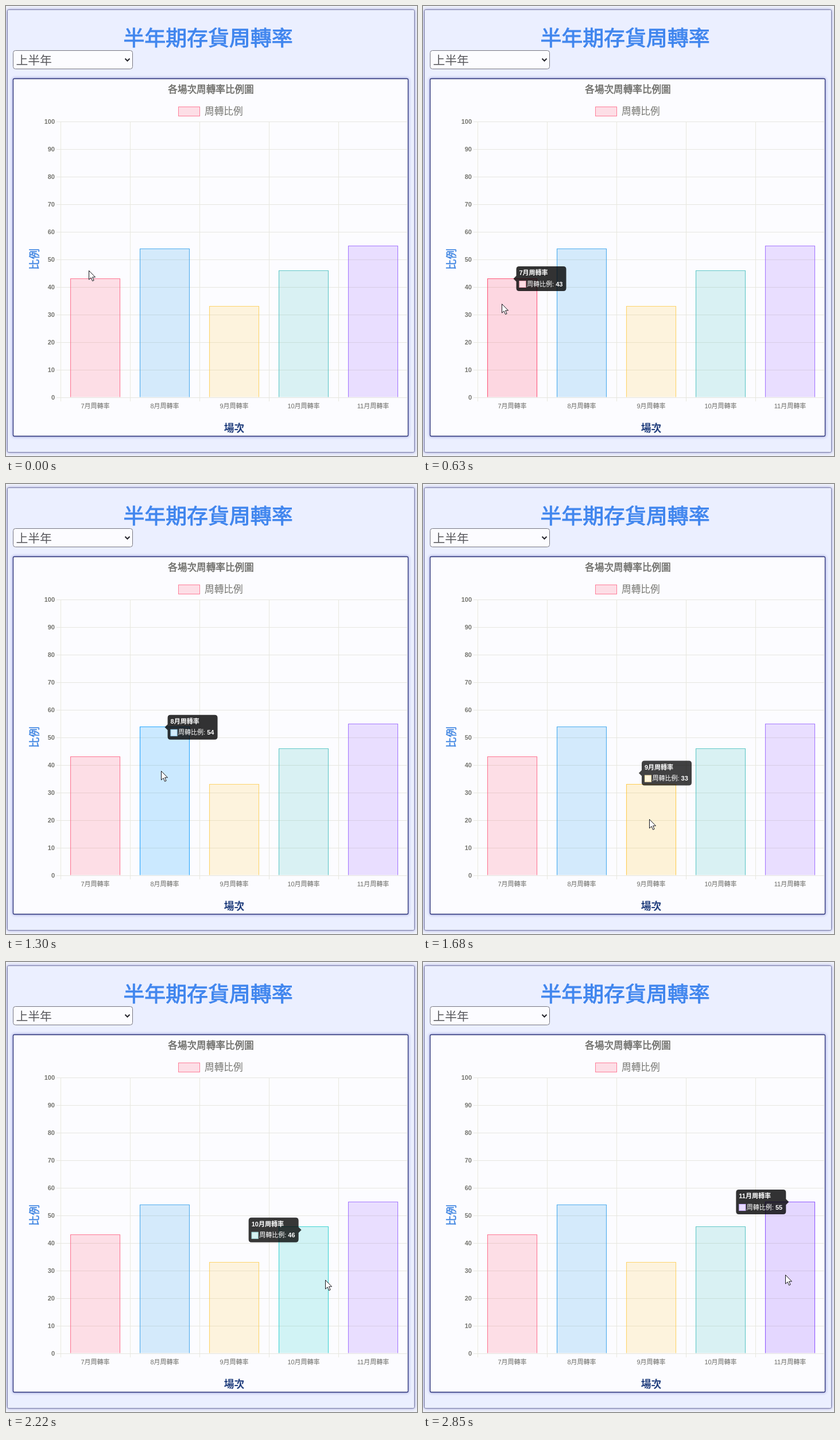
Animation, 716 px wide and 783 px high, one loop 2.89 s. Source, as an HTML page:

```html
<!DOCTYPE html>
<html lang="zh-Hant">
<head>
<meta charset="utf-8">
<title>半年期存貨周轉率</title>
<style>
html, body { margin: 0; width: 100%; height: 100%; overflow: hidden; background: #f0f2fb; }
svg { display: block; width: 100%; height: 100%; }
text { font-family: "Liberation Sans", "Noto Sans CJK TC", "Noto Sans CJK JP", "Noto Sans CJK", sans-serif; }
.glow { filter: drop-shadow(0 0 2.5px #8a8dd0); }
</style>
</head>
<body>
<svg id="stage" viewBox="0 0 716 783"></svg>
<script>
const NS = 'http://www.w3.org/2000/svg';
const stage = document.getElementById('stage');
const LOOP = 2890, HOLD = 126, STEP = 41.85;
const LEFT = 95.5, TOP = 201, BOTTOM = 680.5, COL = 121, BAR = 87;
const TIP_W = 87, TIP_H = 43, GAP = 45;

const bars = [
  { month: 7, value: 43, rgb: [255, 99, 132], hot: [255, 64, 104], enter: 250 },
  { month: 8, value: 54, rgb: [54, 162, 235], hot: [5, 154, 255], enter: 1044 },
  { month: 9, value: 33, rgb: [255, 206, 86], hot: [255, 196, 52], enter: 1544 },
  { month: 10, value: 46, rgb: [75, 192, 192], hot: [34, 207, 207], enter: 2043 },
  { month: 11, value: 55, rgb: [153, 102, 255], hot: [129, 66, 255], enter: 2526 }
];

// time, x, y of the pointer tip
const path = [
  [130, 144, 460], [250, 142, 476], [420, 138, 511], [630, 137, 518], [850, 164, 513],
  [990, 199, 507], [1044, 233, 503], [1190, 264, 500], [1300, 270, 499], [1400, 285, 514],
  [1490, 320, 544], [1544, 354, 566], [1610, 380, 579], [1680, 394, 583], [1850, 414, 580],
  [1985, 441, 573], [2043, 475, 567], [2140, 530, 557], [2220, 556, 553], [2400, 560, 552],
  [2475, 564, 551], [2526, 596, 548], [2600, 631, 544], [2850, 631, 544]
];

function el(name, attrs, parent = stage) {
  const node = document.createElementNS(NS, name);
  for (const key in attrs) node.setAttribute(key, attrs[key]);
  return parent.appendChild(node);
}

// cy is the optical middle of the line
function label(str, x, cy, size, fill, opts = {}, parent = stage) {
  const node = el('text', { x, y: cy + size * 0.37, 'font-size': size, fill, ...opts }, parent);
  node.textContent = str;
  return node;
}

const clamp = v => Math.max(0, Math.min(1, v));
const mix = (a, b, p) => a + (b - a) * p;
const outQuart = p => 1 - (1 - clamp(p)) ** 4;
const rgba = (c, a) => `rgba(${c.map(Math.round)},${a})`;
const yOf = v => BOTTOM - (BOTTOM - TOP) * v / 100;
const mid = { 'text-anchor': 'middle' };
const midBold = { ...mid, 'font-weight': 700 };
// a thin outline gives a weight between regular and bold
const medium = (color, width) => ({ ...mid, stroke: color, 'stroke-width': width });

function drawPage() {
  el('rect', { width: 716, height: 783, fill: '#f0f2fb' });
  el('rect', { x: 2.5, y: 6.5, width: 709, height: 770, rx: 2, fill: '#ebefff', stroke: '#7c7ea4', class: 'glow' });
  label('半年期存貨周轉率', 352, 55.5, 36.9, '#4186ee', medium('#4186ee', 1));
  el('rect', { x: 12.5, y: 77.5, width: 208, height: 32, rx: 4, fill: '#fcfcff', stroke: '#777781' });
  label('上半年', 17.5, 94, 20.8, '#58585c', { 'font-weight': 300 });
  el('path', { d: 'M207.5 91.5l4 4 4-4', fill: 'none', stroke: '#25252c', 'stroke-width': 2 });
  el('rect', { x: 12.5, y: 126.5, width: 688, height: 622, rx: 2, fill: '#fcfcff', stroke: '#2b3378', 'stroke-width': 1.3, class: 'glow' });
}

function drawChart() {
  label('各場次周轉率比例圖', 357, 145, 16.6, '#6c6c68', medium('#6c6c68', 0.5));
  el('rect', { x: 300.5, y: 175.5, width: 37, height: 16, fill: rgba(bars[0].rgb, 0.2), stroke: rgba(bars[0].rgb, 0.8) });
  label('周轉比例', 346, 182.5, 16.7, '#74746f');

  for (let v = 0; v <= 100; v += 10) {
    const y = Math.round(yOf(v)) + 0.5;
    el('path', { d: `M88 ${y}H699.5`, stroke: '#e6e6e0' });
    label(v, 85, y - 0.5, 11, '#74746e', { 'text-anchor': 'end', 'font-weight': 700 });
  }
  for (let i = 0; i < 5; i++) el('path', { d: `M${LEFT + i * COL} 201V688`, stroke: '#e8e8de' });

  bars.forEach((b, i) => {
    b.mid = LEFT + (i + 0.5) * COL - 0.5;
    b.y = Math.round(yOf(b.value)) + 0.5;
    const x = b.mid - BAR / 2 + 0.5, w = BAR - 1;
    b.fill = el('rect', { x, y: b.y, width: w, height: BOTTOM - b.y });
    b.edge = el('path', { d: `M${x} ${BOTTOM}V${b.y}h${w}V${BOTTOM}`, fill: 'none', 'stroke-width': 1.1 });
    b.leave = i < 4 ? bars[i + 1].enter - GAP : LOOP;
    b.tipX = i < 3 ? b.mid + 7 : b.mid - 7 - TIP_W;
    label(b.month + '月周轉率', b.mid, 696, 11, '#6c6c68', mid);
  });

  label('場次', 397.5, 734, 17.8, '#24417f', midBold);
  label('比例', 0, 0, 18.4, '#4186e2', { ...medium('#4186e2', 0.5), transform: 'translate(49.5 440.5) rotate(-90)' });
}

function makeTip() {
  const g = el('g', {});
  const box = el('path', { fill: 'rgba(0,0,0,.8)' }, g);
  const title = label('', 5, 11, 11, '#fff', { 'font-weight': 700 }, g);
  el('rect', { x: 5, y: 25, width: 12, height: 12, fill: '#fff' }, g);
  const chip = el('rect', { x: 5.5, y: 25.5, width: 11, height: 11 }, g);
  const line = label('周轉比例: ', 18.5, 30.5, 11, '#fff', {}, g);
  const value = el('tspan', { 'font-weight': 700 }, line);
  return { g, box, title, chip, value };
}

function tipShape(onLeft) {
  const h = TIP_H / 2, r = 5, s = TIP_H - 2 * r, w = TIP_W - 2 * r;
  const right = onLeft ? `v${s}` : `v${h - r - 5}l5 5-5 5v${h - r - 5}`;
  const left = onLeft ? `v${5 + r - h}l-5-5 5-5v${5 + r - h}` : `v${-s}`;
  return `M${r} 0h${w}q${r} 0 ${r} ${r}${right}q0 ${r} ${-r} ${r}h${-w}q${-r} 0 ${-r} ${-r}${left}q0 ${-r} ${r} ${-r}z`;
}

drawPage();
drawChart();
const tip = makeTip();
const pointer = el('path', {
  d: 'M0 0V15.5L3.6 12.2 6.1 18 8.6 16.9 6.1 11.3H11Z',
  fill: '#fff', stroke: '#16161c', 'stroke-linejoin': 'round'
});

function heat(b, t) {
  const on = outQuart((t - b.enter) / 400);
  return t < b.enter ? 0 : t < b.leave ? on : 1 - outQuart((t - b.leave) / 400);
}

function drawTip(t) {
  const i = bars.findLastIndex(b => t >= b.enter);
  if (i < 0) return tip.g.setAttribute('opacity', 0);
  const b = bars[i], from = bars[i - 1] || b;
  const p = outQuart((t - b.enter) / 400);
  const start = i ? 1 - GAP / 200 : 0;
  const alpha = t < b.leave ? mix(start, 1, clamp((t - b.enter) / 200)) : 1 - (t - b.leave) / 200;
  const x = mix(from.tipX, b.tipX, p), y = mix(from.y, b.y, p) - TIP_H / 2;
  tip.g.setAttribute('opacity', alpha);
  tip.g.setAttribute('transform', `translate(${x} ${y})`);
  tip.box.setAttribute('d', tipShape(i < 3));
  tip.title.textContent = b.month + '月周轉率';
  tip.value.textContent = b.value;
  tip.chip.setAttribute('fill', rgba(b.rgb, 0.22));
  tip.chip.setAttribute('stroke', rgba(b.rgb, 0.5));
}

function pointerAt(t) {
  const n = path.findIndex(k => k[0] > t);
  if (n === 0) return path[0].slice(1);
  if (n < 0) return path[path.length - 1].slice(1);
  const a = path[n - 1], b = path[n], p = (t - a[0]) / (b[0] - a[0]);
  return [mix(a[1], b[1], p), mix(a[2], b[2], p)];
}

function draw(ms) {
  // the picture advances in even steps after a short hold
  const t = ms < HOLD ? 0 : HOLD + 4 + Math.floor((ms - HOLD) / STEP) * STEP;
  for (const b of bars) {
    const h = heat(b, t), c = b.rgb.map((v, k) => mix(v, b.hot[k], h));
    b.fill.setAttribute('fill', rgba(c, 0.2));
    b.edge.setAttribute('stroke', rgba(c, 0.85));
  }
  drawTip(t);
  const [x, y] = pointerAt(t).map(Math.round);
  pointer.setAttribute('transform', `translate(${x + 0.5} ${y + 0.5})`);
}

const began = performance.now();
function tick() {
  draw((performance.now() - began) % LOOP);
  requestAnimationFrame(tick);
}
tick();
</script>
</body>
</html>
```
